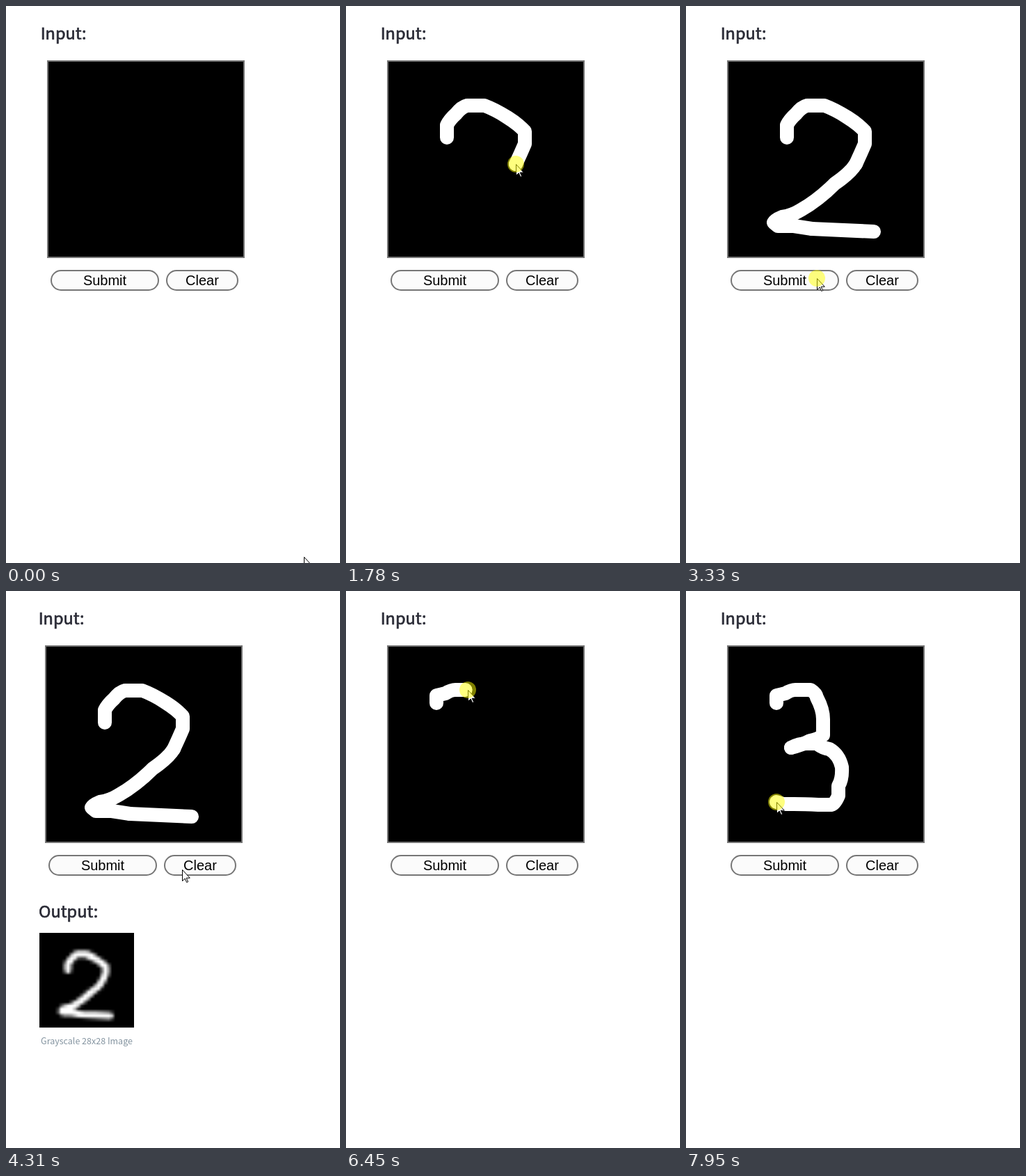
An HTML page with a canvas for the animation above (8000 ms loop, 480 px wide and 800 px high).

```html
<!DOCTYPE html>
<html lang="en">
<head>
<meta charset="utf-8">
<title>Digit sketch</title>
<style>
  html, body { margin: 0; width: 100%; height: 100%; overflow: hidden; background: #fff; }
  svg, canvas { position: absolute; left: 0; top: 0; display: block; }
  #preview { left: 48px; top: 491px; width: 136px; height: 136px; }
  text { font-family: "Noto Sans CJK JP", "Noto Sans CJK SC", "Noto Sans CJK", "Open Sans", sans-serif; }
  .head { font-size: 23.5px; fill: #2a2b36; stroke: #2a2b36; stroke-width: .7; }
  .caption { font-size: 12.5px; fill: #8494a0; text-anchor: middle; }
  .button rect { fill: #fbfbfb; stroke: #767676; stroke-width: 2; }
  .button text { font: 20px "Liberation Sans", Arial, sans-serif; text-anchor: middle; fill: #000; }
  #ink { fill: none; stroke: #fff; stroke-width: 20; stroke-linecap: round; stroke-linejoin: round; }
</style>
</head>
<body>
<svg width="480" height="800" viewBox="0 0 480 800">
  <defs id="routes"></defs>
  <g id="form">
    <text class="head" x="49.7" y="48">Input:</text>
    <rect x="60" y="79" width="282" height="282" fill="#000" stroke="#767676" stroke-width="2"/>
    <g id="ink"></g>
    <g class="button">
      <rect x="65" y="380" width="154" height="28" rx="14"/>
      <text x="142" y="401">Submit</text>
      <rect x="231" y="380" width="102" height="28" rx="14"/>
      <text x="282" y="401">Clear</text>
    </g>
  </g>
  <g id="output">
    <text class="head" x="47" y="469">Output:</text>
    <text class="caption" x="116" y="651">Grayscale 28x28 Image</text>
  </g>
</svg>
<canvas id="preview" width="28" height="28"></canvas>
<svg width="480" height="800" viewBox="0 0 480 800">
  <g id="pointer">
    <path d="M.5 .5V16.5L4.2 13L6.7 18.5L8.7 17.6L6.2 12.2H11.3Z" fill="#fff" stroke="#000"/>
    <circle id="press" r="12" fill="#ff0" fill-opacity=".5"/>
  </g>
</svg>
<script>
const LOOP = 8000, REFRESH = 70, TRAIL = 3;
const CLEARED = 5205, OUTPUT_ON = 3510, OUTPUT_OFF = 5304;
const $ = id => document.getElementById(id);

// The pointer rests between moves; a move with `until` leaves ink up to that time.
const moves = [
  { from: 0, to: 130, d: "M428 791L286 610" },
  { from: 260, to: 470, d: "M286 610Q205 400 198 257" },
  { from: 620, to: 830, d: "M198 257Q185 215 145 191" },
  { from: 1010, to: 1780, power: 1.88, until: CLEARED,
    d: "M145 189V171Q149 163 158 155Q166 145 174 143H199Q215 149 232 160Q248 170 257 180V198Q251 212 244 227" },
  { from: 1780, to: 2260, until: CLEARED,
    d: "M244 227Q236 240 214 255Q190 279 165 293Q152 301 138 303Q128 307 126 311L132 316H155L181 320" },
  { from: 2260, to: 2580, until: CLEARED, d: "M181 320Q225 322 270 324" },
  { from: 2580, to: 2730, d: "M270 324H260" },
  { from: 2860, to: 3050, d: "M260 324Q225 365 188 391" },
  { from: 4040, to: 4310, d: "M188 391L253 400" },
  { from: 5212, to: 5580, d: "M253 400Q160 320 130 267" },
  { from: 5580, to: 5870, d: "M130 267V161" },
  { from: 5940, to: 7070, power: 1.4, until: LOOP,
    d: "M130 161V150Q135 149 143 147Q151 142 157 142H179Q187 147 188 153Q197 170 197 184V207Q190 213 178 215Q165 222 151 225" },
  { from: 7070, to: 7950, power: 1.48, until: LOOP,
    d: "M151 225Q162 219 174 219H188Q197 226 206 227Q220 235 224 253Q225 270 219 280V294Q214 306 209 307H190Q170 306 155 306H140L130 303" }
];
const presses = [[1010, 2645], [3330, 3415], [5120, CLEARED], [5940, LOOP]];

const show = (el, on) => { el.style.visibility = on ? "visible" : "hidden"; };
const within = (t, from, to) => t >= from && t < to;

for (const move of moves) {
  move.path = document.createElementNS("http://www.w3.org/2000/svg", "path");
  move.path.setAttribute("d", move.d);
  $(move.until ? "ink" : "routes").append(move.path);
  move.length = move.path.getTotalLength();
}

// Distance covered along a move, advancing once per screen refresh.
function travelled({ from, to, length, power = 1 }, t) {
  const steps = Math.round((to - from) / REFRESH);
  const k = Math.min(1, Math.floor((t - from) / (to - from) * steps + 1e-6) / steps);
  return length * k ** power;
}

function drawPreview() {
  const ctx = $("preview").getContext("2d");
  ctx.fillRect(0, 0, 28, 28);
  ctx.scale(0.1, 0.1);
  ctx.translate(-61, -80);
  ctx.strokeStyle = "#fff";
  ctx.lineWidth = 20;
  ctx.lineCap = ctx.lineJoin = "round";
  const digit = new Path2D();
  moves.filter(m => m.until === CLEARED).forEach(m => digit.addPath(new Path2D(m.d)));
  ctx.stroke(digit);
}

function drawInk(move, t) {
  show(move.path, within(t, move.from, move.until));
  const tail = t < move.to ? TRAIL : 0;
  const drawn = Math.max(0.01, travelled(move, t) - tail);
  move.path.setAttribute("stroke-dasharray", `${drawn} ${move.length + 50}`);
}

function render(t) {
  const move = moves.findLast(m => t >= m.from);
  const { x, y } = move.path.getPointAtLength(travelled(move, t));
  $("pointer").setAttribute("transform", `translate(${Math.round(x)} ${Math.round(y)})`);
  show($("press"), presses.some(([from, to]) => within(t, from, to)));
  moves.filter(m => m.until).forEach(m => drawInk(m, t));

  const hasOutput = within(t, OUTPUT_ON, OUTPUT_OFF);
  $("form").setAttribute("transform", `translate(${hasOutput ? -3 : 0} 0)`);
  show($("output"), hasOutput);
  show($("preview"), hasOutput);
}

drawPreview();
const start = performance.now();
function tick() {
  render((performance.now() - start) % LOOP);
  requestAnimationFrame(tick);
}
tick();
</script>
</body>
</html>
```
